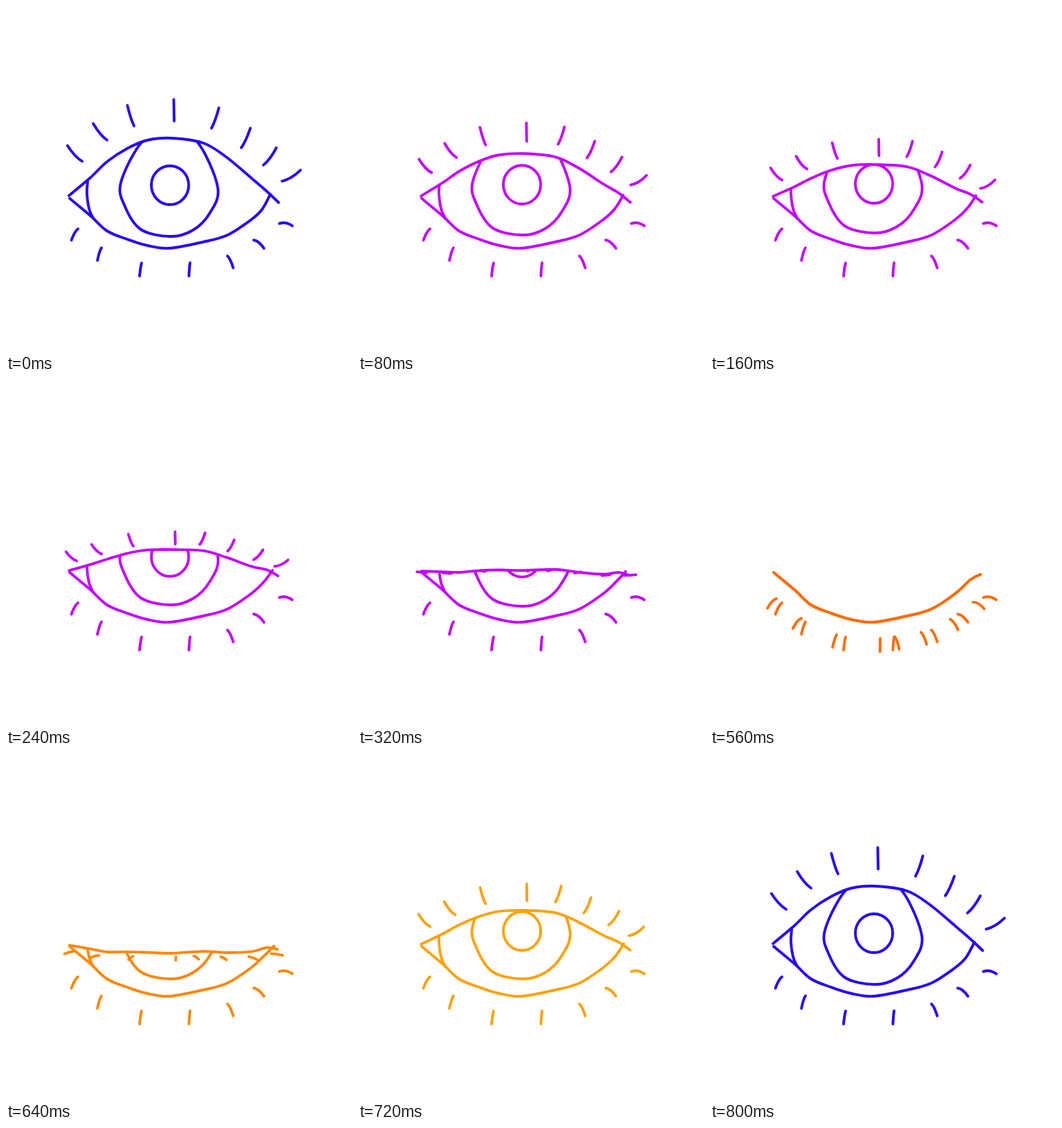
Recreate the animation shown at these times as an HTML page with a canvas. Size 500x500 px, loop 1440 ms.

```html
<!DOCTYPE html>
<html lang="en">
<head>
<meta charset="utf-8">
<title>Blinking eye</title>
<style>
  html, body { margin: 0; width: 100%; height: 100%; overflow: hidden; background: #fff; }
  canvas { display: block; width: 500px; height: 500px; }
</style>
</head>
<body>
<canvas id="stage" width="500" height="500"></canvas>
<script>
const ctx = document.getElementById('stage').getContext('2d');
const LOOP = 1440, STEP = 80, LAST = 10;

const MAGENTA = [196, 0, 255];
// open: 0 shut to 1 wide; rise: how far the iris is lifted
const POSES = [
  { color: [38, 0, 255], open: 1, rise: 0 },
  { color: MAGENTA, open: 0.86, rise: 2 },
  { color: MAGENTA, open: 0.66, rise: 8 },
  { color: MAGENTA, open: 0.28, rise: 4 },
  { color: [255, 108, 0], open: 0, rise: 8 },
  { color: [255, 162, 10], open: 0.78, rise: 8 }
];

const WIDE = [[91, 274], [122, 248], [146, 225], [175, 206], [204, 194], [240, 191],
              [285, 198], [318, 218], [355, 249], [376, 267], [394, 284]];
const SHUT = [[92, 278], [122, 303], [146, 325], [175, 337], [204, 346], [236, 350],
              [285, 341], [320, 331], [354, 309], [377, 288], [391, 281]];
const LOWER = [...SHUT.slice(0, -2), [370, 294], [382, 272]];
const CORNER = [[118, 254], [117, 272], [121, 296], [131, 315]];
const IRIS = [[238, 333], [195, 323], [172, 290], [166, 255], [197, 196],
              [236, 182], [276, 196], [306, 262], [294, 300], [270, 324]];

// x when wide, x when shut, tilt in degrees
const UPPER_LASHES = [[110, 96, -43], [146, 132, -40], [185, 183, -18], [243, 246, -1],
                      [297, 267, 20], [340, 305, 25], [372, 347, 37], [399, 380, 59]];
// x, tilt
const LOWER_LASHES = [[104, -30], [138, -18], [196, -9], [266, -5], [320, 26], [358, 51], [395, 80]];

const mix = (a, b, w) => a + (b - a) * w;
const mixPoints = (p, q, w) => p.map(([x, y], i) => [mix(x, q[i][0], w), mix(y, q[i][1], w)]);

function smoothstep(from, to, v) {
  const t = Math.max(0, Math.min(1, (v - from) / (to - from)));
  return t * t * (3 - 2 * t);
}

// Smooth curve through the points.
function curve(pts, closed) {
  const n = pts.length;
  const at = i => pts[closed ? (i + n) % n : Math.max(0, Math.min(n - 1, i))];
  const path = new Path2D();
  path.moveTo(...at(0));
  for (let i = 0; i < (closed ? n : n - 1); i++) {
    const [a, b, c, d] = [at(i - 1), at(i), at(i + 1), at(i + 2)];
    path.bezierCurveTo(b[0] + (c[0] - a[0]) / 6, b[1] + (c[1] - a[1]) / 6,
                       c[0] - (d[0] - b[0]) / 6, c[1] - (d[1] - b[1]) / 6, ...c);
  }
  return path;
}

function heightAt(pts, x) {
  const found = pts.findIndex(p => p[0] >= x);
  const i = found < 0 ? pts.length - 1 : Math.max(1, found);
  const [[x1, y1], [x2, y2]] = [pts[i - 1], pts[i]];
  return mix(y1, y2, (x - x1) / (x2 - x1));
}

// Limits drawing to one side of a lid; edge is the far side's y.
function clipSide(lid, edge) {
  const side = new Path2D(lid);
  side.lineTo(500, edge);
  side.lineTo(0, edge);
  ctx.clip(side);
}

// side and flip run from 1 (above the lid, pointing up) to -1 (below, pointing down).
function drawLash(lid, x, tilt, length, side, flip) {
  const gap = 25 + Math.abs(x - 240) / 15;
  const y = heightAt(lid, x) - gap * side;
  const angle = tilt * Math.PI / 180;
  const dx = length * Math.sin(angle), dy = -length * Math.cos(angle) * flip;
  ctx.beginPath();
  ctx.moveTo(x, y);
  ctx.quadraticCurveTo(x + dx / 2, y + dy / 2 + 5 * flip, x + dx, y + dy);
  ctx.stroke();
}

function drawEye(color, open, rise) {
  const upper = mixPoints(SHUT, WIDE, open), lower = mixPoints(SHUT, LOWER, open);
  const lid = curve(upper), low = curve(lower);

  ctx.clearRect(0, 0, 500, 500);
  ctx.strokeStyle = `rgb(${color.map(Math.round)})`;
  ctx.lineWidth = 3.9;
  ctx.lineCap = ctx.lineJoin = 'round';

  ctx.save();
  clipSide(lid, 500);
  clipSide(low, 0);
  if (open > 0.35) ctx.stroke(curve(CORNER));
  ctx.stroke(curve(IRIS.map(([x, y]) => [x, y - rise]), true));
  ctx.beginPath();
  ctx.ellipse(237, 259 - rise * 0.4, 27, 28, 0, 0, 2 * Math.PI);
  ctx.stroke();
  ctx.restore();

  ctx.stroke(lid);
  ctx.stroke(low);

  const flip = 2 * smoothstep(0.1, 0.8, open) - 1;
  for (const [wideX, shutX, tilt] of UPPER_LASHES)
    drawLash(upper, mix(shutX, wideX, open ** 2), tilt, 19 + 12 * open ** 3, 2 * open - 1, flip);
  for (const [x, tilt] of LOWER_LASHES)
    drawLash(SHUT, x, tilt, 19, -1, -1);
}

function frame() {
  const step = Math.min(LAST, Math.floor(performance.now() % LOOP / STEP));
  // Every second step lies halfway between two poses.
  const pos = step % LAST ? (step + 1) / 2 : 0;
  const a = POSES[Math.floor(pos)], b = POSES[Math.ceil(pos)], w = pos % 1;
  drawEye(a.color.map((c, i) => mix(c, b.color[i], w)), mix(a.open, b.open, w), mix(a.rise, b.rise, w));
  requestAnimationFrame(frame);
}
frame();
</script>
</body>
</html>
```
